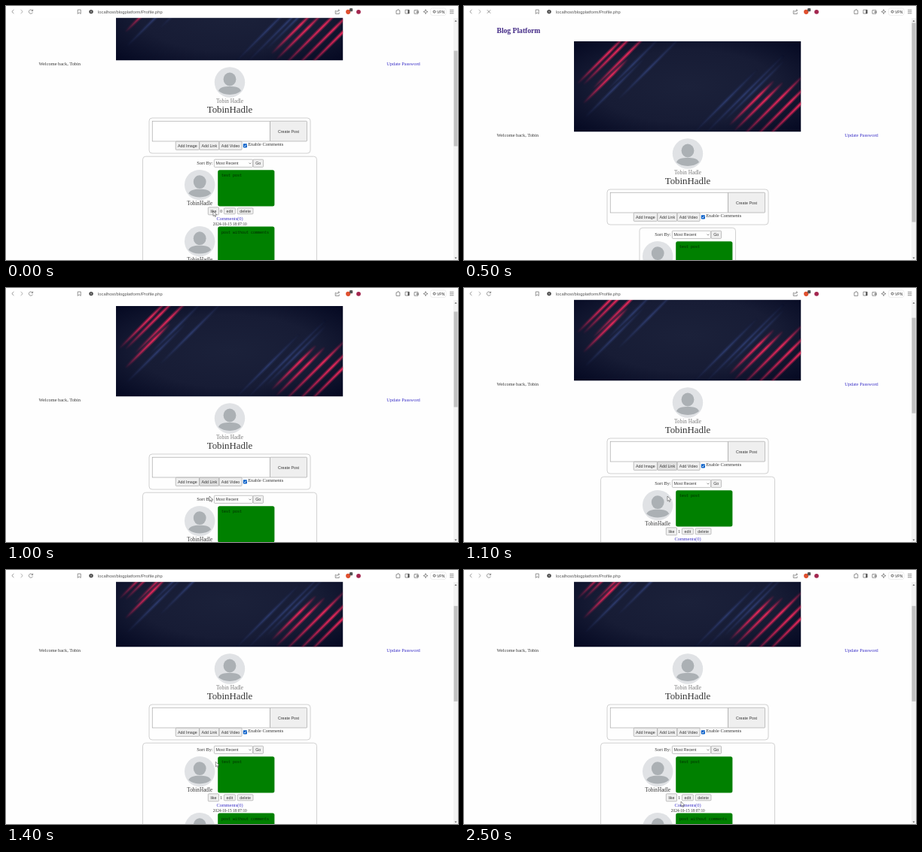
Write an HTML page that moves like this. It is 600 by 338 pixels and loops after 2600 ms.

```html
<!DOCTYPE html>
<html lang="en">
<head>
<meta charset="utf-8">
<title>Blog Platform</title>
<style>
  html, body { margin: 0; height: 100%; overflow: hidden; background: #fefefe; }
  svg { display: block; width: 100vw; height: 100vh; }
  text { font: 6.4px "Liberation Serif", Times, serif; fill: #383838; }
  .ui, .btn text { font: 5.33px "Liberation Sans", Arial, sans-serif; }
  .mid, .btn text { text-anchor: middle; }
  .link { fill: #3c32c8; }
  .btn rect { fill: #efefef; stroke: #9a9a9a; stroke-width: .6; }
  .btn.hover rect { fill: #e0e0e0; }
  .box { fill: #fefefe; stroke: #c6c6c6; stroke-width: .8; }
  .icon { fill: none; stroke: #666; stroke-width: .7; }
</style>
</head>
<body>
<svg viewBox="0 0 600 338">
  <defs>
    <radialGradient id="night" r=".72">
      <stop stop-color="#1b213a"/><stop offset=".55" stop-color="#171c35"/><stop offset="1" stop-color="#030720"/>
    </radialGradient>
    <linearGradient id="red" y1="1" x2="1" y2="0">
      <stop stop-color="#e8265a" stop-opacity="0"/><stop offset=".4" stop-color="#e8265a" stop-opacity=".75"/>
      <stop offset=".65" stop-color="#f22a5c"/><stop offset="1" stop-color="#e8265a" stop-opacity="0"/>
    </linearGradient>
    <linearGradient id="blue" y1="1" x2="1" y2="0">
      <stop stop-color="#33437c" stop-opacity="0"/><stop offset=".5" stop-color="#33437c" stop-opacity=".7"/>
      <stop offset="1" stop-color="#33437c" stop-opacity="0"/>
    </linearGradient>
    <clipPath id="frame"><rect x="146" y="47" width="301.2" height="120.3"/></clipPath>
    <g id="avatar">
      <circle r="20.2" fill="#e0e2e5"/>
      <g fill="#abb0b4">
        <ellipse cy="-4" rx="8.4" ry="8.9"/>
        <path d="M-15 11.5C-13 6.5-7 5.6 0 5.6S13 6.5 15 11.5Q9 16.4 0 16.4T-15 11.5Z"/>
      </g>
    </g>
  </defs>

  <g id="page">
    <text x="43.5" y="36.2" style="font-size:9.6px;font-weight:bold;fill:#432a86">Blog Platform</text>
    <g id="banner" clip-path="url(#frame)">
      <rect x="146" y="46" width="302" height="122" fill="url(#night)"/>
    </g>
    <text x="43.5" y="174.4">Welcome back, Tobin</text>
    <text class="link" x="505.2" y="174.4">Update Password</text>
    <use href="#avatar" x="297" y="196.5"/>
    <text class="mid" x="297" y="223.7" style="font-size:7.3px;fill:#7c7c7c">Tobin Hadle</text>
    <text class="mid" x="297" y="236.6" style="font-size:12.9px">TobinHadle</text>

    <rect class="box" x="190" y="244" width="214" height="47" rx="4"/>
    <rect x="194.2" y="248.2" width="156.3" height="26.8" fill="#fff" stroke="#9a9a9a" stroke-width=".6"/>
    <g id="form"></g>
    <rect x="314.8" y="278.2" width="5.2" height="5.2" rx=".8" fill="#0b62c9"/>
    <path d="M315.8 280.9l1.2 1.2 2-2.5" fill="none" stroke="#fff" stroke-width=".8"/>
    <text x="321.2" y="281">Enable Comments</text>

    <rect id="list" class="box" y="295.2" height="400" rx="4"/>
    <text x="253.3" y="306.2">Sort By:</text>
    <rect x="276.4" y="299.2" width="51.2" height="10.2" rx="1" fill="#fff" stroke="#9a9a9a" stroke-width=".6"/>
    <text class="ui" x="278.6" y="306.2">Most Recent</text>
    <path class="icon" d="M322.5 303.6l1.5 1.5 1.5-1.5"/>
    <g id="posts"></g>
  </g>

  <g id="scrollbar">
    <rect x="594" y="16" width="6" height="322" fill="#f3f3f3"/>
    <path d="M595.5 20.8h3l-1.5-2ZM595.5 334.5h3l-1.5 2Z" fill="#666"/>
    <rect id="thumb" x="594.5" width="5" fill="#c1c1c1"/>
  </g>

  <g id="toolbar">
    <rect width="600" height="15.8" fill="#fff"/>
    <path class="icon" d="M10.4 5l-2.6 2.5 2.6 2.5M95.2 5h4v5.4l-2-1.6-2 1.6Z"/>
    <path class="icon" d="M19.6 5l2.6 2.5-2.6 2.5" style="stroke:#888"/>
    <path id="reload" class="icon" d="M35.3 6.4A2.6 2.6 0 1 0 35.4 8.5M35.6 4.6v2h-2"/>
    <path id="stop" class="icon" d="M30.8 5.3l4.4 4.4m0-4.4l-4.4 4.4"/>
    <circle cx="113" cy="7.6" r="2.7" fill="#444"/>
    <path d="M113 6.2v2.8" stroke="#fff" stroke-width=".7"/>
    <text class="ui" x="122" y="9.6" style="font-size:5.8px;fill:#555">localhost/blogplatform/Profile.php</text>
    <path class="icon" d="M438.6 6.4h-1.4v4h5v-2M438.8 8.6q.3-2.8 3.6-2.8m-1.4-1.4l1.6 1.4-1.6 1.4"/>
    <circle cx="454.2" cy="7.8" r="3.1" fill="#e0502f"/>
    <rect x="456" y="3" width="4.2" height="4.2" rx="1" fill="#555"/>
    <circle cx="468" cy="7.8" r="2.9" fill="#a3264f"/>
    <path class="icon" d="M518 6h1.6q0-1.6 1-1.6t1 1.6h1.2v4.4h-4.8Z
      M530 5.2h5.2v4.8h-5.2ZM542 5.6h5v4.6h-5ZM545 7.4h2.4v1.4h-2.4Z
      M557 4.6l.8 2.2 2.2.8-2.2.8-.8 2.2-.8-2.2-2.2-.8 2.2-.8Z
      M589 5.4h5.4m-5.4 2.2h5.4m-5.4 2.2h5.4"/>
    <path d="M533.4 5.2h1.8v4.8h-1.8Z" fill="#444"/>
    <rect x="563.5" y="2.8" width="20.5" height="9.6" rx="2.5" fill="none" stroke="#ddd" stroke-width=".5"/>
    <circle cx="568.6" cy="7.6" r="1.5" fill="none" stroke="#555"/>
    <text class="ui" x="572" y="9.5" style="font-size:5px">VPN</text>
  </g>

  <path id="cursor" d="M0 0V6.6L1.5 5.3 2.5 7.6 3.6 7.1 2.6 4.9H4.7Z" fill="#fff" stroke="#333" stroke-width=".5"/>
</svg>
<script>
const $ = id => document.getElementById(id);
const add = (id, markup) => $(id).insertAdjacentHTML('beforeend', markup);

const button = (label, x, y, w, h, id = '') =>
  `<g class="btn" id="${id}"><rect x="${x}" y="${y}" width="${w}" height="${h}" rx="1"/>
   <text x="${x + w / 2}" y="${y + h / 2 + 1.9}">${label}</text></g>`;

// Diagonal light streaks, each a soft glow around a thin core: left, bottom, length, colour
const streaks = [
  [204, 125, 84, 'blue'], [160, 149, 80, 'blue'], [190, 112, 70, 'blue'],
  [306, 168, 84, 'blue'], [320, 170, 105, 'blue'], [345, 153, 80, 'blue'],
  [150, 104, 66, 'red'], [158, 105, 72, 'red'], [171, 110, 72, 'red'], [158, 130, 60, 'red'],
  [352, 159, 60, 'red'], [358, 167, 66, 'red'], [366, 177, 86, 'red'],
  [380, 181, 84, 'red'], [396, 181, 76, 'red']
];
for (const [x, y, len, hue] of streaks) {
  const line = `<path d="M${x} ${y}l${len} ${-len}" stroke="url(#${hue})"`;
  add('banner', `${line} stroke-width="5" opacity=".4"/>${line} stroke-width="2" opacity=".85"/>`);
}

add('form', button('Create Post', 350.5, 248.2, 49, 26.8) + button('Add Image', 225.2, 275.2, 31.3, 11.2) +
  button('Add Link', 256.8, 275.2, 26, 11.2, 'addLink') + button('Add Video', 283.1, 275.2, 30, 11.2));

const post = (y, body, n) => `<g transform="translate(0 ${y})">
  <use href="#avatar" x="257.2" y="19.8"/>
  <text class="mid" x="257.2" y="46.6" style="font-size:7.2px">TobinHadle</text>
  <rect x="281.2" width="75.2" height="48.2" rx="2.5" fill="#008000"/>
  <text x="286" y="9.2" style="font:5px 'Liberation Mono',monospace;fill:#002800">${body}</text>
  ${button('like', 268.3, 49.5, 14.2, 10, 'like' + n)}
  <text id="likes${n}" x="283.9" y="56.6">0</text>
  ${button('edit', 289.4, 50.5, 15, 8)}${button('delete', 307.2, 50.5, 20.8, 8)}
  <text class="mid link" x="297" y="67">Comments(0)</text>
  <text class="mid" x="297.3" y="73.6" style="font-size:5.3px">2024-10-15 18:07:10</text></g>`;
add('posts', button('Go', 328, 299.2, 13.5, 10.2) +
  post(313.3, 'test post', 1) + post(388.4, 'post without comments', 2));

// Linear interpolation over [time, value] pairs
function track(keys, t) {
  const i = keys.findIndex(k => k[0] > t);
  if (i < 0) return keys[keys.length - 1][1];
  if (!i) return keys[0][1];
  const [t0, a] = keys[i - 1], [t1, b] = keys[i];
  return a + (b - a) * (t - t0) / (t1 - t0);
}
const scrollKeys = [[499, 95], [500, 0], [800, 0], [900, 8], [1000, 23], [1100, 44], [1200, 63], [1300, 65]];
const cursorX = [[400, 275], [600, 270], [1300, 270], [1800, 312], [2200, 274], [2400, 288]];
const cursorY = [[400, 273], [600, 277], [1300, 277], [1800, 168], [2200, 298], [2400, 308]];

const show = (id, on) => $(id).setAttribute('visibility', on ? 'visible' : 'hidden');

function draw(now) {
  const t = Math.floor(now % 2600 / 100) * 100;
  const scroll = track(scrollKeys, t), partial = t === 500;
  $('page').setAttribute('transform', `translate(0 ${-scroll})`);
  $('thumb').setAttribute('y', 22.5 + scroll * .39);
  $('thumb').setAttribute('height', partial ? 265 : 127);
  $('list').setAttribute('x', partial ? 233 : 181.5);
  $('list').setAttribute('width', partial ? 127.5 : 231);

  const loading = t >= 100 && t < 700;
  show('stop', loading);
  show('reload', !loading);
  $('likes1').textContent = t < 500 ? 0 : 1;
  $('like1').classList.toggle('hover', t >= 100 && t < 500);
  $('addLink').classList.toggle('hover', t >= 600 && t <= 1200);
  show('cursor', !partial && t !== 1800);
  $('cursor').setAttribute('transform', `translate(${track(cursorX, t)} ${track(cursorY, t)})`);
  requestAnimationFrame(draw);
}
draw(0);
</script>
</body>
</html>
```
